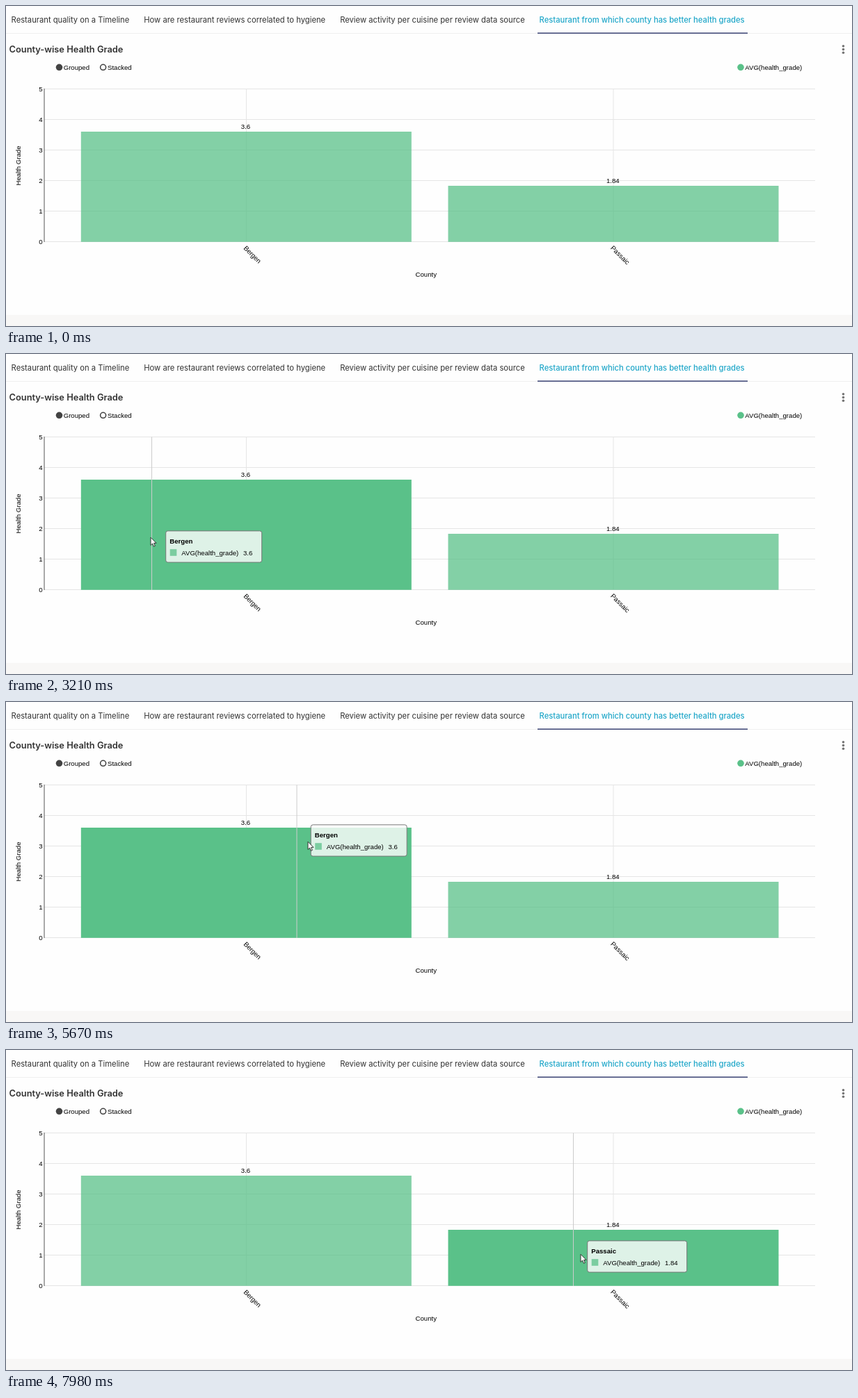
An HTML page that plays this animation: 1216 px wide and 461 px high, repeating every 8 s.

```html
<!DOCTYPE html>
<html lang="en">
<head>
<meta charset="utf-8">
<title>County-wise Health Grade</title>
<style>
  html, body { margin: 0; width: 100%; height: 100%; overflow: hidden; background: #fefefe; }
  svg { display: block; width: 1216px; height: 461px; }
  text { font: 9.6px "Liberation Sans", Arial, sans-serif; fill: #000; }
  .tab { font: 400 11.23px Inter, sans-serif; fill: #323232; }
  .active { font-weight: 500; fill: #20a7c9; }
  .title { font: 600 12.8px Inter, sans-serif; fill: #323232; }
  .bold { font-weight: 700; }
  .mid { text-anchor: middle; }
  .end { text-anchor: end; }
  .grid { stroke: #e5e5e5; }
  .bar, .green { fill: #5ac189; }
  .bar { fill-opacity: .75; }
</style>
</head>
<body>
<svg viewBox="0 0 1216 461">
  <path d="M0 39.5H1216" stroke="#f0f0f0"/>
  <rect x="764" y="38.3" width="302" height="1.6" fill="#454e7c"/>
  <rect y="445" width="1216" height="16" fill="#f8f7f6"/>

  <text class="tab" x="7.6" y="23.5">Restaurant quality on a Timeline</text>
  <text class="tab" x="198.2" y="23.5">How are restaurant reviews correlated to hygiene</text>
  <text class="tab" x="480.2" y="23.5">Review activity per cuisine per review data source</text>
  <text class="tab active" x="766.6" y="23.5">Restaurant from which county has better health grades</text>
  <text class="title" x="4.6" y="67.3">County-wise Health Grade</text>

  <g fill="#757575">
    <circle cx="1203.5" cy="57.8" r="1.8"/>
    <circle cx="1203.5" cy="62.5" r="1.8"/>
    <circle cx="1203.5" cy="67.2" r="1.8"/>
  </g>

  <circle cx="76.5" cy="88.3" r="4.8" fill="#444"/>
  <text x="82.7" y="91.5">Grouped</text>
  <circle cx="139.6" cy="88.3" r="4" fill="#fff" stroke="#444" stroke-width="1.6"/>
  <text x="146" y="91.5">Stacked</text>
  <circle class="green" cx="1056" cy="88.3" r="4.8"/>
  <text x="1062.3" y="91.5">AVG(health_grade)</text>

  <g id="axis"></g>
  <path class="grid" d="M345.4 119.5V340M873 119.5V340"/>
  <path d="M55 119V340" stroke="#555"/>
  <rect class="bar" x="107.8" y="181" width="475" height="158.8"/>
  <rect class="bar" x="635.5" y="259" width="475" height="80.8"/>
  <text class="mid" x="344.5" y="177">3.6</text>
  <text class="mid" x="872.3" y="255.3">1.84</text>
  <text transform="translate(341 349.5) rotate(45)">Bergen</text>
  <text transform="translate(868.6 349.3) rotate(45)">Passaic</text>
  <text class="mid" x="603.8" y="389.5">County</text>
  <text class="mid" transform="translate(21.4 230) rotate(-90)">Health Grade</text>

  <path id="guide" d="M0 119.5V340" stroke="#ccc"/>
  <g id="tip">
    <rect id="box" height="45.2" rx="3" fill="#fff" fill-opacity=".8" stroke="#777"/>
    <text id="name" class="bold" x="5.6" y="18.2"></text>
    <rect class="green" x="6" y="26.3" width="9.6" height="9.6" fill-opacity=".75"/>
    <text x="22.6" y="35">AVG(health_grade)</text>
    <text id="value" x="111.2" y="35"></text>
  </g>
  <path id="cursor" d="M0 0V11.2L2.6 8.8L4.4 13L6.3 12.2L4.6 8.1H8Z" fill="#fff" stroke="#222" stroke-width=".9"/>
</svg>
<script>
const LOOP = 8000, START = 1470, STEP = 67.5;
const $ = id => document.getElementById(id);

// Pointer waypoints: step, x, y
const path = [
  [0, 790, 455], [2, 711, 342], [3, 630, 270], [5, 551.8, 204], [6, 548, 204],
  [8, 549, 204], [11, 549, 204], [19, 270, 338], [22, 215, 312], [24, 209.5, 277.5],
  [25, 208, 264], [30, 188, 215], [35, 214, 197], [38, 222.5, 196.5], [39, 226, 196],
  [48, 362, 206], [54, 418, 199.5], [61, 418, 199.5], [62, 434, 201], [72, 675, 290],
  [80, 706.5, 305.5], [86, 706.5, 305.5], [87, 716, 302], [95, 815.5, 297.5], [96, 826, 294]
];

const bars = [
  { name: 'Bergen', value: '3.6', x: 108, y: 181, tipWidth: 138 },
  { name: 'Passaic', value: '1.84', x: 635.5, y: 259, tipWidth: 143 }
];
const barEls = document.querySelectorAll('.bar');

$('axis').innerHTML = [0, 1, 2, 3, 4, 5].map(v => {
  const y = 339.5 - v * 44;
  return `<path class="grid" d="M55 ${y}H1163"/><text class="end" x="52.6" y="${y + 3.2}">${v}</text>`;
}).join('');

// Monotone cubic through the waypoints, axis 1 = x, 2 = y
const rise = (i, axis) => path[i + 1] && path[i]
  ? (path[i + 1][axis] - path[i][axis]) / (path[i + 1][0] - path[i][0]) : 0;
function slope(i, axis) {
  const a = rise(i - 1, axis), b = rise(i, axis);
  return a * b > 0 ? 2 * a * b / (a + b) : 0;
}
function along(k, axis) {
  let i = 0;
  while (i < path.length - 2 && k > path[i + 1][0]) i++;
  const p = path[i], q = path[i + 1], h = q[0] - p[0], u = (k - p[0]) / h, w = 1 - u;
  return p[axis] * w * w * (1 + 2 * u) + q[axis] * u * u * (3 - 2 * u)
    + h * u * w * (slope(i, axis) * w - slope(i + 1, axis) * u);
}
const pointer = k => ({ x: along(k, 1), y: along(k, 2) });

function hovered(bar, k) {
  if (k < 0) return 0;
  const { x, y } = pointer(k);
  return x > bar.x && x < bar.x + 475 && y > bar.y && y < 340 ? 1 : 0;
}

const move = (el, x, y) => el.setAttribute('transform', `translate(${x} ${y})`);
const show = (el, on) => el.setAttribute('visibility', on ? 'visible' : 'hidden');

function draw(t) {
  const k = Math.min(96, Math.floor((t - START) / STEP));

  // Hover fades in and out over five steps
  bars.forEach((bar, i) => {
    let level = 0;
    for (let n = 1; n <= 5; n++) level += hovered(bar, k - n) / 5;
    barEls[i].style.fillOpacity = .75 + .25 * level;
  });

  show($('cursor'), k >= 0);
  if (k >= 0) {
    const c = pointer(k);
    move($('cursor'), c.x, c.y + .3);
  }

  // Guide line and tooltip trail the pointer by one step
  const p = pointer(Math.max(0, k - 1)), on = k > 0 && p.y < 345;
  show($('guide'), on);
  show($('tip'), on);
  if (!on) return;
  const bar = bars[p.x < 609 ? 0 : 1];
  move($('guide'), p.x, 0);
  move($('tip'), p.x + 20.2, p.y - 22.6);
  $('box').setAttribute('width', bar.tipWidth);
  $('name').textContent = bar.name;
  $('value').textContent = bar.value;
}

function tick() {
  draw(performance.now() % LOOP);
  requestAnimationFrame(tick);
}
tick();
</script>
</body>
</html>
```
